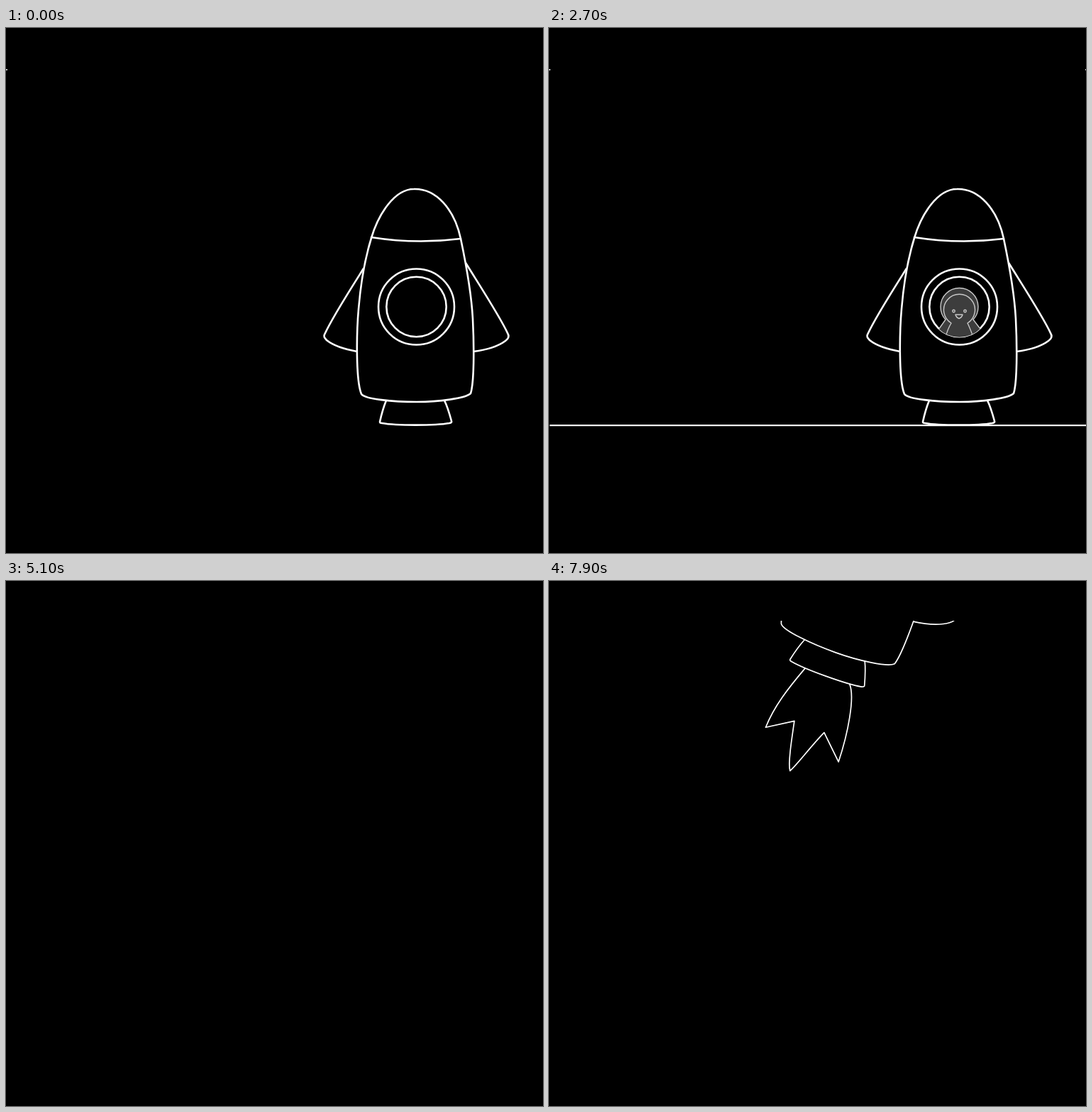
These frames come from a looping animation (757 by 740 pixels, 8 s). An HTML page:

```html
<!DOCTYPE html>
<html lang="en">
<head>
<meta charset="utf-8">
<title>Penguin rocket</title>
<style>
  html, body { margin: 0; width: 100%; height: 100%; overflow: hidden; background: #000; }
  svg { display: block; width: 100%; height: 100%; }
  path, circle { vector-effect: non-scaling-stroke; stroke-linejoin: round; stroke-linecap: round; }
  #rocket { fill: #000; stroke: #fff; }
  .penguin { fill: #3d3d3d; stroke: #c8c8c8; stroke-width: 1.4; }
  .open { fill: none; }
</style>
</head>
<body>
<svg viewBox="0 0 757 740">
  <defs>
    <clipPath id="sky"><rect y="56" width="757" height="684"/></clipPath>
    <clipPath id="porthole"><circle cx="578.5" cy="393" r="42.7"/></clipPath>
  </defs>

  <rect id="cornerLeft" y="58" width="2" height="1.5" fill="#fff"/>
  <rect id="cornerRight" x="756" y="58" width="1" height="1.5" fill="#fff"/>
  <rect id="ground" x="1" y="559" height="2.2" fill="#fff"/>

  <g id="jumper" class="penguin">
    <path d="M450 567L464 572 471 566M476 566L481 565 486 558 478 560"/>
    <path d="M481 515L495 543Q495 546 492 545L484 540"/>
    <path d="M442 516C434 503 438 477 463 477C481 477 488 491 488 503C488 510 483 515 479 519C484 528 486 540 485 550C483 565 470 568 456 568C440 567 431 560 431 546C431 536 437 525 442 516Z"/>
    <path class="open" d="M486 489C478 480 466 485 461 493C457 501 458 508 461 515C455 528 451 538 452 547C454 558 462 562 469 562C477 562 483 558 485 550"/>
    <path d="M442 516L457 545Q456 548 452 545L434 533"/>
    <path d="M482 507L489 509 485 513Z"/>
    <circle cx="481" cy="503" r="1.4"/>
  </g>

  <g clip-path="url(#sky)">
    <g id="rocket">
      <path id="flame" d="M335 535C322 570 312 600 311 632L346 610C352 640 358 670 364 678C370 668 380 635 391 611L424 643C423 600 415 550 402 535"
            transform="translate(578.5 393) scale(.909) translate(-367.5 -352)"/>
      <path d="M504 339C480 377 460 408 449 432Q447 435 452 440C462 448 478 453 495 456"/>
      <path d="M648 331C669 365 697 408 707 430Q711 436 704 441C692 450 675 454 659 456"/>
      <path d="M536 525C531 537 529 546 527 555Q527 557 530 557C550 560.5 605 560.5 625 557Q629 556 628 554C625 543 622 533 618 525"/>
      <path d="M501 516C493 497 494 430 497 396C500 360 506 325 515 296C525 262 548 227 575 227C606 226 632 255 641 297C649 335 656 372 658 410C660 450 660 500 655 515C648 522 610 527 579 527C545 527 506 523 501 516Z"/>
      <path class="open" d="M515 295Q578 305 641 297"/>
      <circle cx="578.5" cy="393" r="53.5"/>
      <circle cx="578.5" cy="393" r="42.2"/>
      <g clip-path="url(#porthole)">
        <g id="passenger" class="penguin">
          <path d="M559 411A26.5 26.5 0 1 1 598 411L611 428 604 445H553L547 428Z"/>
          <path class="open" d="M559 436Q562 424 567 416A22 22 0 1 1 590 416Q594 424 598 436"/>
          <path d="M573 404H583Q582 408 578 409.5Q574 408 573 404Z"/>
          <circle cx="570.5" cy="399" r="1.7"/>
          <circle cx="586.5" cy="399" r="1.7"/>
        </g>
      </g>
    </g>
  </g>
</svg>
<script>
  const LOOP = 8000;
  const LIFTOFF = 3600, CLOSE_UP = 5100, DEPART = 6900;
  const $ = id => document.getElementById(id);
  const mix = (a, b, p) => a + (b - a) * p;
  const span = (t, from, to) => Math.min(1, Math.max(0, (t - from) / (to - from)));
  const smooth = p => p * p * (3 - 2 * p);
  const show = (id, on) => $(id).style.display = on ? '' : 'none';
  const place = (id, value) => $(id).setAttribute('transform', value);

  // The picture advances in 100 ms steps, later in 200 ms steps.
  const quantize = t => t < 2500 ? Math.floor(t / 100) * 100 : 2500 + Math.floor((t - 2500) / 200) * 200;

  function jumperOffset(t) {
    if (t < 900) {
      const p = span(t, 100, 900);
      return [mix(-503, 0, p), -134 * 4 * p * (1 - p)];
    }
    if (t < 1100) {
      const p = span(t, 900, 1100);
      return [17 * p, 4 * p];
    }
    const rise = span(t, 1100, 2100), fall = span(t, 2200, 2500);
    return [mix(17, 120, rise), mix(4, -382, 1 - (1 - rise) ** 2) + 280 * fall ** 2];
  }

  function rocketPose(t) {
    if (t < CLOSE_UP) {
      const flight = Math.max(0, t - LIFTOFF) / 500;
      return { x: 578.5 + (flight ? .7 : 0), y: 393 - 56 * flight ** 2, angle: 0, scale: 1 };
    }
    const arrive = (1 - span(t, CLOSE_UP, 6500)) ** 4;
    const settle = smooth(span(t, 6300, DEPART));
    const leave = span(t, DEPART, 7900) ** 1.4;
    return {
      x: mix(mix(367.5, 361, settle), 453.5, leave),
      y: mix(332 + 592 * arrive + 20 * settle, -38, leave),
      angle: 19.8 * smooth(span(t, 6200, 7200)),
      scale: 1.1
    };
  }

  function draw(t) {
    const closeUp = t >= CLOSE_UP;
    show('cornerLeft', t < 3500);
    show('cornerRight', t >= 2300 && t < 3500);
    show('ground', !closeUp);
    $('ground').setAttribute('width', 756 * span(t, 0, 1120));

    show('jumper', t > 100 && t < 2500);
    place('jumper', `translate(${jumperOffset(t)})`);

    const { x, y, angle, scale } = rocketPose(t);
    place('rocket', `translate(${x} ${y}) rotate(${angle}) scale(${scale}) translate(-578.5 -393)`);
    $('rocket').style.strokeWidth = closeUp ? 1.7 : 2.6;
    show('flame', closeUp);

    show('passenger', t >= 2400);
    const rise = 70 * (1 - smooth(span(t, 2350, 2700)));
    place('passenger', closeUp
      ? 'translate(580.5 386.7) scale(1.166) translate(-578.5 -393)'
      : `translate(0 ${rise})`);
  }

  const start = performance.now();
  function tick() {
    draw(quantize((performance.now() - start) % LOOP));
    requestAnimationFrame(tick);
  }
  tick();
</script>
</body>
</html>
```
